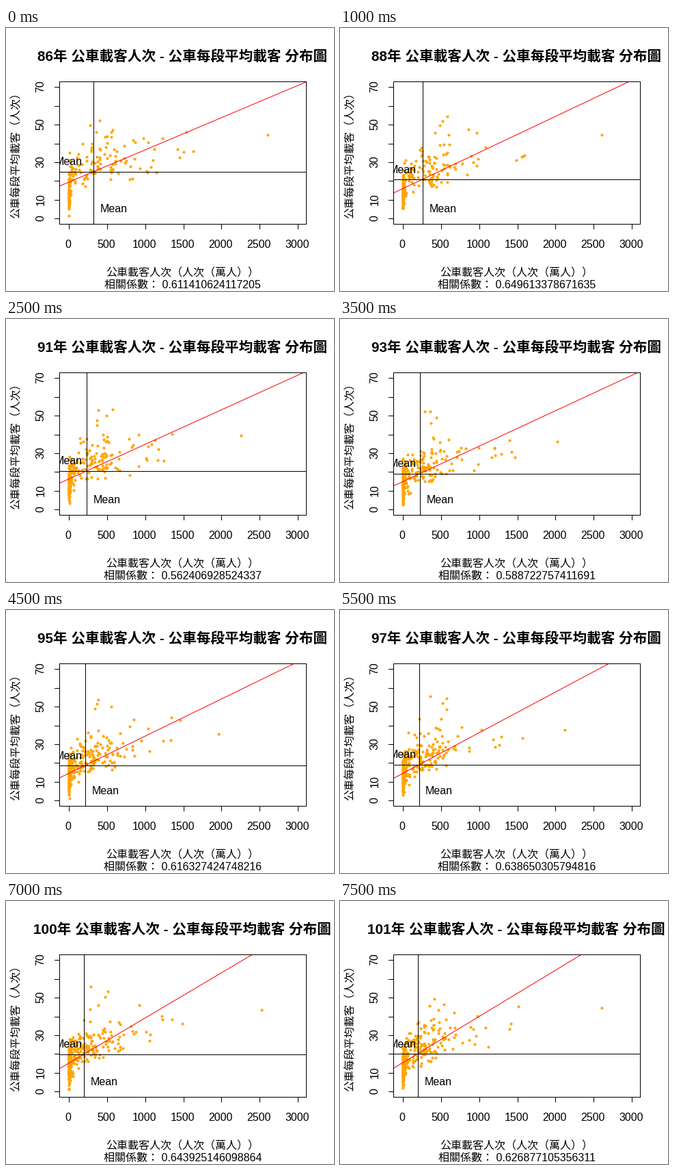
These frames come from a looping animation (480x384 px, 8000 ms). A matplotlib script:

```python
import numpy as np
import matplotlib.pyplot as plt
from matplotlib.animation import FuncAnimation
from matplotlib.patches import Rectangle

W, H, DPI = 480, 384, 72
LEFT, RIGHT, TOP, BOTTOM = 77.5, 438.5, 77.5, 285.5
X0, Y0 = 91.5, 277.8        # stage position of the data origin
SX, SY = 0.1117, 2.743      # pixels per unit
FIRST, LAST = 86, 101

plt.rcParams["font.family"] = ["Liberation Sans", "Noto Sans CJK JP"]

# key years: mean x, mean y, trend slope (stage pixels), correlation
KEYS = {
    86: (128, 210, 0.421, 0.611410624117205),
    88: (121, 221, 0.472, 0.649613378671635),
    91: (118, 222, 0.452, 0.562406928524337),
    93: (117, 226, 0.463, 0.588722757411691),
    95: (116, 227, 0.486, 0.616327424748216),
    99: (115, 224, 0.577, 0.660973186841416),
    101: (114, 223, 0.604, 0.626877105356311),
}


def px(v):
    return X0 + SX * np.asarray(v)


def py(v):
    return Y0 - SY * np.asarray(v)


def stats(year):
    """Interpolate the yearly figures between the key years."""
    return [np.interp(year, list(KEYS), col) for col in zip(*KEYS.values())]


def cloud(year, mx, my, slope):
    """Idle column, light, heavy and busy routes, and the busiest one."""
    rng = np.random.default_rng(year)
    k = (year - FIRST) / (LAST - FIRST)
    n = 185 + 145 * k
    idle, light, heavy = (int(n * s) for s in
                          (0.36 + 0.04 * k, 0.20 + 0.10 * k, 0.40 - 0.10 * k))
    mean_x, mean_y = (mx - X0) / SX, (Y0 - my) / SY
    rise = slope * SX / SY

    x1 = rng.exponential(8, idle)
    y1 = np.clip(rng.normal(11.5, 4.5, idle) + 0.15 * x1, 1, 26)

    x2 = rng.exponential(75, light)
    y2 = np.clip(rng.normal(mean_y - 3, 5, light) + 0.04 * x2, 8, 38)

    x3 = 120 + rng.gamma(2, 0.65 * mean_x, heavy)
    y3 = mean_y + 1.5 + 0.5 * rise * (x3 - mean_x) + rng.gumbel(0, 5, heavy)
    y3 = np.clip(y3, mean_y - 4, 46)

    x4 = np.append(rng.uniform(800, 1600, 6), rng.uniform(250, 600, 4))
    y4 = np.append(rng.normal(33, 6, 6), rng.uniform(43, 56, 4))

    swing = np.cos(2 * np.pi * (year - FIRST - 1) / 15)
    x5, y5 = [2300 + 340 * swing], [40 + 5 * swing]
    return np.column_stack([px(np.concatenate([x1, x2, x3, x4, x5])),
                            py(np.concatenate([y1, y2, y3, y4, y5]))])


fig = plt.figure(figsize=(W / DPI, H / DPI), dpi=DPI, facecolor="white")
ax = fig.add_axes([0, 0, 1, 1])
ax.set_xlim(0, W)
ax.set_ylim(H, 0)
ax.axis("off")


def line(xs=(), ys=(), **kw):
    style = dict(color="black", lw=1, antialiased=False, zorder=3) | kw
    return ax.plot(xs, ys, **style)[0]


def label(x, y, text="", size=16, ha="center", **kw):
    return ax.text(x, y, text, fontsize=size, ha=ha, va="baseline",
                   rotation_mode="anchor", zorder=5, **kw)


def box(**kw):
    return Rectangle((LEFT, TOP), RIGHT - LEFT, BOTTOM - TOP, **kw)


ax.add_patch(box(fill=False, ec="black", lw=1, antialiased=False, zorder=4))
clip = box(transform=ax.transData)

for v in range(0, 3001, 500):
    x = int(px(v)) + 0.5
    line([x, x], [BOTTOM, BOTTOM + 7])
    label(x - 0.5, 321, str(v))
for v in range(0, 71, 10):
    y = int(py(v)) + 0.5
    line([LEFT - 7, LEFT], [y, y])
    if v in (0, 10, 30, 50, 70):
        label(55.5, y, str(v), rotation=90)

label(258, 362, "公車載客人次（人次（萬人））")
label(20, 182, "公車每段平均載客（人次）", rotation=90)
title = label(258.3, 47.5, size=20.6, weight="bold")
corr = label(258.7, 380.3)

dots = ax.scatter([], [], s=17, c="#ffa500", linewidths=0,
                  antialiased=False, zorder=2)
trend = line(color="red", antialiased=True)
v_mean, h_mean = line(), line()
v_text = label(0, 269, "Mean", ha="left")
h_text = label(112, 0, "Mean", ha="right")
for item in (dots, trend, h_text):
    item.set_clip_path(clip)
    item.set_clip_on(True)


def draw(i):
    year = FIRST + i
    mx, my, slope, r = stats(year)
    dots.set_offsets(cloud(year, mx, my, slope))

    cx, cy = round(mx) - 0.5, round(my) - 0.5
    v_mean.set_data([cx, cx], [TOP, BOTTOM])
    h_mean.set_data([LEFT, RIGHT], [cy, cy])
    ends = np.array([LEFT, RIGHT])
    trend.set_data(ends, cy + 0.5 - slope * (ends - cx))
    v_text.set_x(mx + 9.7)
    h_text.set_y(my - 9.5)

    title.set_text(f"{year}年 公車載客人次 - 公車每段平均載客 分布圖")
    corr.set_text(f"相關係數： {r:.15f}")
    return dots, trend, v_mean, h_mean, v_text, h_text, title, corr


anim = FuncAnimation(fig, draw, frames=LAST - FIRST + 1, interval=500,
                     repeat=True, repeat_delay=0)
plt.show()
```
